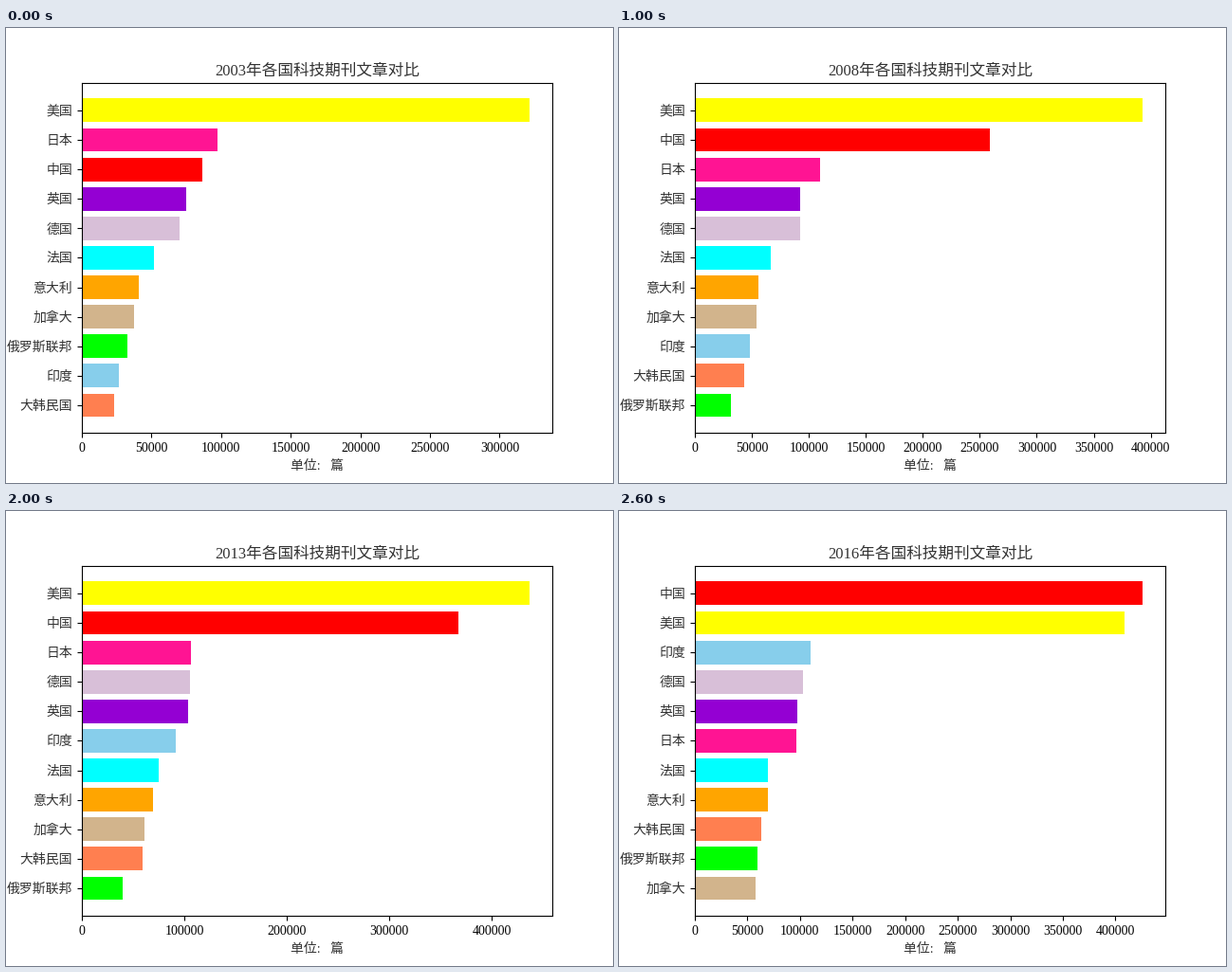
Animation, 640 px wide and 480 px high, one loop 2.8 s. Source, as a matplotlib script:

```python
import numpy as np
import matplotlib.pyplot as plt
from matplotlib.animation import FuncAnimation

plt.rcParams["font.family"] = ["Liberation Serif", "Noto Sans CJK JP"]

FIRST, LAST = 2003, 2016
KEY_YEARS = np.array([2003, 2006, 2009, 2013, 2016])
INK = "0.2"

# Country: bar colour, thousands of articles in the key years
COUNTRIES = {
    "美国": ("yellow", [321.8, 383.1, 399, 437, 409]),
    "日本": ("deeppink", [97.4, 109, 109.5, 106.5, 96.5]),
    "中国": ("red", [86.6, 189.8, 288, 367, 426.2]),
    "英国": ("darkviolet", [75, 88.4, 94.5, 103.5, 97.5]),
    "德国": ("thistle", [70.2, 84.4, 95.4, 105, 103.1]),
    "法国": ("cyan", [51.7, 62.5, 68.5, 74.5, 69.4]),
    "意大利": ("orange", [40.9, 50.3, 58.2, 69, 69.1]),
    "加拿大": ("tan", [37.5, 49.4, 55.9, 60.8, 57.4]),
    "俄罗斯联邦": ("lime", [32.4, 29.6, 32.6, 39.6, 59.1]),
    "印度": ("skyblue", [26.4, 37.5, 55.6, 91.5, 110.3]),
    "大韩民国": ("coral", [23.2, 36.5, 46.4, 58.9, 63.1]),
}

# One smooth curve per country through its key points
CURVES = {name: np.polyfit(KEY_YEARS - FIRST, points, len(points) - 1)
          for name, (_, points) in COUNTRIES.items()}

fig, ax = plt.subplots(figsize=(6.4, 4.8), dpi=100)


def draw(i):
    counts = {name: 1000 * np.polyval(curve, i)
              for name, curve in CURVES.items()}
    names = sorted(counts, key=counts.get)
    ax.clear()
    ax.barh(names, [counts[n] for n in names],
            color=[COUNTRIES[n][0] for n in names])
    ax.set_title(f"{FIRST + i}年各国科技期刊文章对比", color=INK)
    ax.set_xlabel("单位:   篇", color=INK)
    ax.tick_params(axis="y", labelcolor=INK)


anim = FuncAnimation(fig, draw, frames=LAST - FIRST + 1, interval=200,
                     init_func=lambda: draw(0), repeat=True)
plt.show()
```
